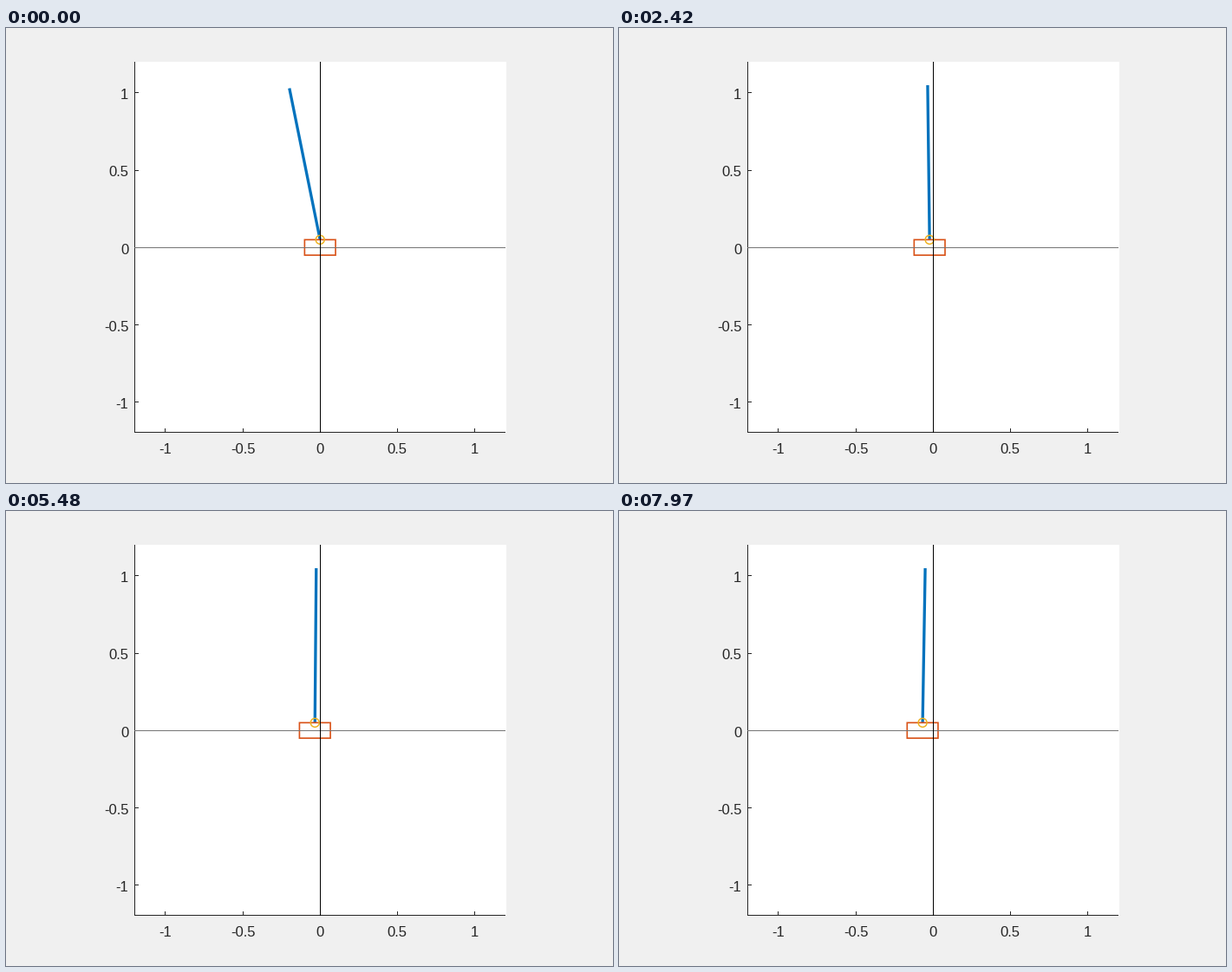
A matplotlib script for the animation above (8 s loop, 700 by 525 pixels).

```python
import numpy as np
import matplotlib.pyplot as plt
from matplotlib.animation import FuncAnimation
from matplotlib.patches import Circle, Rectangle

W, H, DPI = 700, 525, 100
LOOP_MS, INTERVAL = 8000, 20
START_MS, STEP_MS = 500, 30
UNIT = 178.3                    # pixels per axis unit
X0, Y0 = 362.2, 253.2           # pixel position of the axis origin
LEFT, RIGHT, TOP, BOTTOM = 148, 577, 39, 467
INK = "#262626"

SWING, PEAK, SHAPE = 70, 0.5, 1.6       # first catch: pixels, seconds, exponent
FIRST_LEAN = -35.4
OMEGA = 3.4                             # natural rate of the rod, 1/s
DRIFT_T = [2.0, 3.25, 4.5, 5.6, 6.4, 7.1, 8.05]
DRIFT_X = [0, 9, -4.5, -6, 6.5, 8, -12.5]


def eased_path(t, times, values):
    """Smoothstep from one key point to the next."""
    keys = np.arange(len(times))
    u = np.interp(t, times, keys)
    s = u % 1
    return np.interp(u - s + s * s * (3 - 2 * s), keys, values)


def cart_path(t):
    """Quick catch under the falling rod, then slow drifting."""
    r = np.maximum(t - START_MS / 1000, 0) / PEAK
    catch = -SWING * r ** SHAPE * np.exp(SHAPE * (1 - r))
    return catch + eased_path(t, DRIFT_T, DRIFT_X)


def tip_path(t, cart):
    """Balanced rod: tip'' = OMEGA^2 (tip - cart), so the tip is a smoothed cart."""
    kernel = np.exp(-OMEGA * np.abs(np.linspace(-2, 2, 401)))
    smooth = np.convolve(cart, kernel / kernel.sum(), "same")
    start = START_MS / 1000
    fall = FIRST_LEAN - np.interp(start, t, smooth)
    return smooth + fall * np.exp(-OMEGA * np.maximum(t - start, 0))


TIMES = np.linspace(-2, 11, 1301)
CART = cart_path(TIMES)
TIP = tip_path(TIMES, CART)


def px(width):
    return width * 72 / DPI


plt.rcParams["font.family"] = "Liberation Sans"
fig = plt.figure(figsize=(W / DPI, H / DPI), dpi=DPI, facecolor="#f0f0f0")
ax = fig.add_axes([0, 0, 1, 1])
ax.set(xlim=(0, W), ylim=(H, 0))
ax.axis("off")


def line(xs, ys, color, width, z):
    return ax.plot(xs, ys, color=color, lw=px(width), zorder=z,
                   solid_capstyle="butt", snap=False)[0]


def label(x, y, text, align):
    ax.text(x, y, text, size=px(16.67), color=INK, ha=align, va="baseline")


def pixel(v):
    return np.floor(v) + 0.5


ax.add_patch(Rectangle((LEFT, TOP), RIGHT - LEFT, BOTTOM - TOP,
                       fc="white", ec="none", zorder=0))
line([LEFT + .5] * 2, [TOP, BOTTOM], INK, 1, 1)
line([LEFT, RIGHT - 1], [BOTTOM - .5] * 2, INK, 1, 1)

for value in (-1, -0.5, 0, 0.5, 1):
    x, y = X0 + value * UNIT, Y0 - value * UNIT
    line([pixel(x)] * 2, [BOTTOM - 5, BOTTOM], INK, 1, 1)
    line([LEFT, LEFT + 5], [pixel(y)] * 2, INK, 1, 1)
    label(x, 491, f"{value:g}", "center")
    label(141.3, y + 7.4, f"{value:g}", "right")

line([LEFT, RIGHT - 1], [pixel(Y0)] * 2, "#757575", 1, 5)
line([pixel(X0)] * 2, [TOP, BOTTOM], "black", 1, 5)

HALF_W, HALF_H = 0.1 * UNIT, 0.05 * UNIT
PIVOT_Y = Y0 - HALF_H
pole = line([], [], "#0072bd", 3.3, 2)
cart = ax.add_patch(Rectangle((0, PIVOT_Y), 2 * HALF_W, 2 * HALF_H,
                              fill=False, ec="#d95319", lw=px(1.67),
                              zorder=3, snap=False))
pivot = ax.add_patch(Circle((0, PIVOT_Y), 5, fill=False, ec="#edb120",
                            lw=px(1.5), zorder=4))


def update(frame):
    steps = max(0, (frame * INTERVAL - START_MS + STEP_MS // 3) // STEP_MS)
    t = (START_MS + steps * STEP_MS) / 1000
    base = X0 + np.interp(t, TIMES, CART)
    tip = X0 + np.interp(t, TIMES, TIP)
    rise = np.sqrt(UNIT ** 2 - (tip - base) ** 2)
    pole.set_data([base, tip], [PIVOT_Y, PIVOT_Y - rise])
    cart.set_x(base - HALF_W)
    pivot.center = base, PIVOT_Y
    return pole, cart, pivot


anim = FuncAnimation(fig, update, frames=LOOP_MS // INTERVAL,
                     interval=INTERVAL, repeat=True, repeat_delay=0)
plt.show()
```
